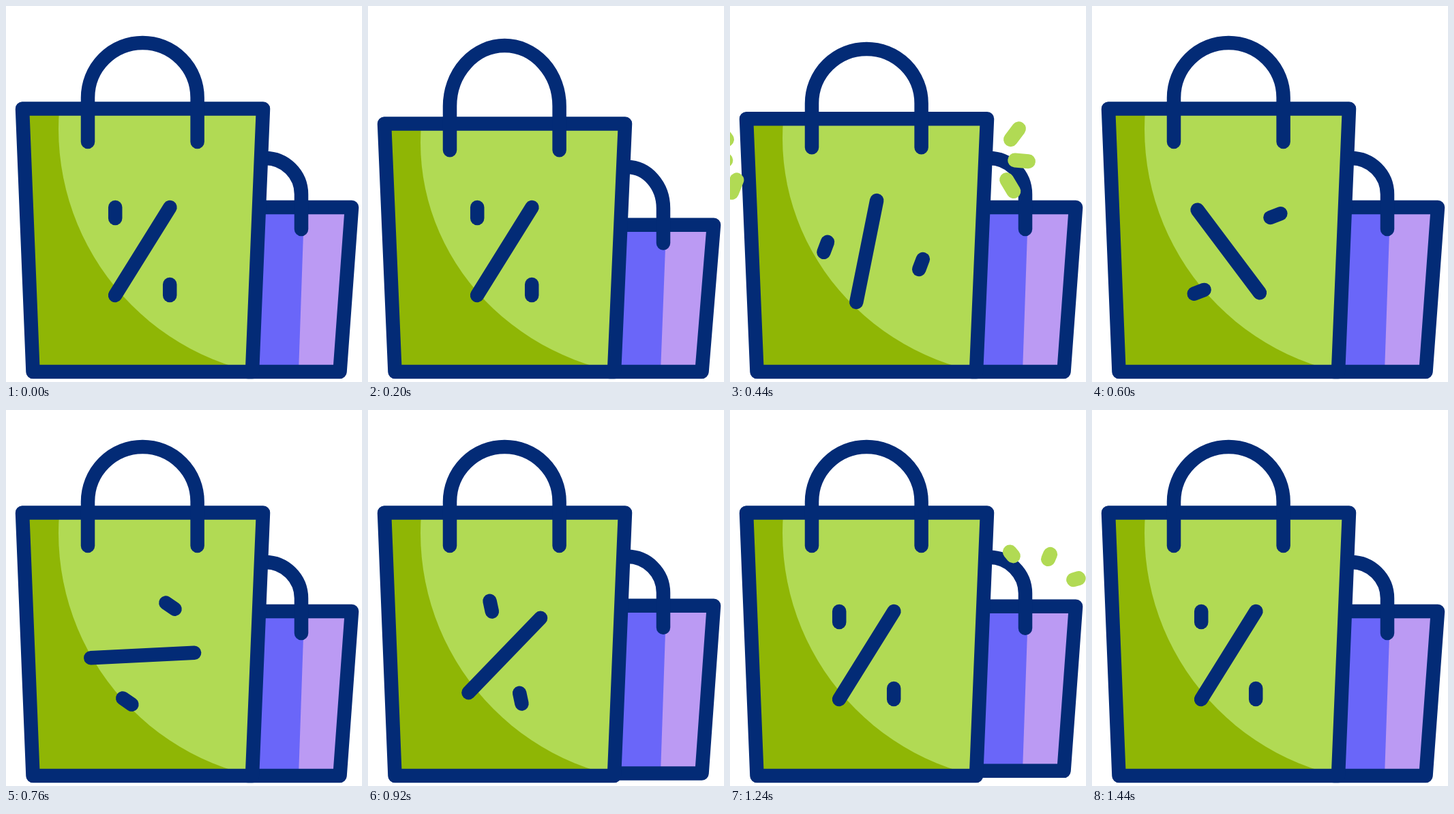
An HTML page with a canvas for the animation above (1.48 s loop, 522 px wide and 551 px high).

```html
<!DOCTYPE html>
<html lang="en">
<head>
<meta charset="utf-8">
<title>Shopping bags</title>
<style>
  html, body { margin: 0; width: 100%; height: 100%; overflow: hidden; background: #fff; }
  canvas { display: block; }
</style>
</head>
<body>
<canvas id="stage" width="522" height="551"></canvas>
<script>
const ctx = document.getElementById('stage').getContext('2d');
const LOOP = 1480, FLOOR = 536;
const NAVY = '#032b76', LIME = '#b1da54', GREEN = '#8fb605', BLUE = '#6a66f9', LILAC = '#bb9af3';

const rad = degrees => degrees * Math.PI / 180;
const ramp = (t, from, to) => Math.min(1, Math.max(0, (t - from) / (to - from)));
const ease = (t, from, to) => { const u = ramp(t, from, to); return u * u * (3 - 2 * u); };
// Eases up to 1, then back down to 0
const pulse = (t, a, b, c, d) => ease(t, a, b) - ease(t, c, d);
const bezier = (u, a, b, c) =>
  [0, 1].map(i => (1 - u) ** 2 * a[i] + 2 * u * (1 - u) * b[i] + u * u * c[i]);

function trace(points, close) {
  ctx.beginPath();
  points.forEach(([x, y]) => ctx.lineTo(x, y));
  if (close) ctx.closePath();
}

function polygon(points, color) {
  trace(points, true);
  ctx.fillStyle = color;
  ctx.fill();
}

function outline(color = NAVY, width = 20.5) {
  ctx.strokeStyle = color;
  ctx.lineWidth = width;
  ctx.stroke();
}

function segment(x1, y1, x2, y2, color, width) {
  trace([[x1, y1], [x2, y2]]);
  outline(color, width);
}

function handle(cx, radius, top, shoulder, end) {
  ctx.beginPath();
  ctx.moveTo(cx - radius, end);
  ctx.ellipse(cx, shoulder, radius, shoulder - top, 0, Math.PI, 2 * Math.PI);
  ctx.lineTo(cx + radius, end);
  outline();
}

function backBag(t) {
  const squash = pulse(t, 100, 280, 280, 440);
  const lift = 11 * pulse(t, 800, 980, 1160, 1360);
  const top = 295 + 44 * squash - lift;
  const bottom = FLOOR - 11 * pulse(t, 850, 1035, 1160, 1360);
  const body = [[355, top], [507, top], [489.5, bottom], [355, bottom]];
  polygon(body, LILAC);
  polygon([[355, top], [437.3, top], [429, bottom], [355, bottom]], BLUE);
  trace(body, true);
  outline();
  const drop = 35 * squash - lift;
  handle(380, 53, 223 + 22.5 * squash - lift, 276 + drop, 327 + drop);
}

function frontBag(t) {
  const squash = pulse(t, 100, 280, 280, 560);
  const top = 150.5 + 37.6 * squash;
  const scale = (FLOOR - top) / (FLOOR - 150.5);
  const body = [[24, top], [377, top], [361, FLOOR], [39.5, FLOOR]];
  polygon(body, GREEN);
  ctx.save();
  trace(body, true);
  ctx.clip();
  ctx.beginPath();
  ctx.ellipse(442, FLOOR - 356 * scale, 365, 365 * scale, 0, 0, 2 * Math.PI);
  ctx.fillStyle = LIME;
  ctx.fill();
  ctx.restore();
  trace(body, true);
  outline();
  const drop = 21 * squash;
  handle(200.3, 80.3, 54 + 13 * pulse(t, 110, 350, 350, 590), 134.5 + drop, 199 + drop);
}

// Each dot swings along two curves while spinning against the bar
const dotPaths = [
  [[-40, -56.5], [-82, 8], [-39, 65], [4.6, 74], [40, 56.5]],
  [[40, 56.5], [115, 17], [64, -60], [2, -100], [-40, -56.5]]
];

function percent(t) {
  const turn = Math.PI * ease(t, 280, 1040);
  ctx.save();
  ctx.translate(200.2, 359.5);
  ctx.save();
  ctx.rotate(-turn);
  segment(40.2, -64.5, -40.2, 64.5);
  ctx.restore();
  for (const [a, b, c, d, e] of dotPaths) {
    const [x, y] = t < 650 ? bezier(ease(t, 280, 650), a, b, c) : bezier(ease(t, 650, 1040), c, d, e);
    ctx.save();
    ctx.translate(x, y);
    ctx.rotate(turn);
    segment(0, -8, 0, 8);
    ctx.restore();
  }
  ctx.restore();
}

// Rays: inner point and direction in degrees
const frontRays = [
  [409, 199, -53], [413.5, 225.7, 5], [403.5, 251, 59],
  [-2, 199, -127], [-2, 225.7, 175], [11.5, 251, 112]
];
const backRays = [[433.5, 235.5, -130], [455.5, 244.5, -67], [476.5, 256.5, -16]];

function burst(t, start, rays) {
  const head = 36 * ramp(t, start, start + 120);
  const tail = 36 * ramp(t, start + 66, start + 186);
  if (head <= tail) return;
  for (const [x, y, angle] of rays) {
    const dx = Math.cos(rad(angle)), dy = Math.sin(rad(angle));
    segment(x + tail * dx, y + tail * dy, x + head * dx, y + head * dy, LIME, 21);
  }
}

function draw(now) {
  const t = now % LOOP;
  ctx.fillStyle = '#fff';
  ctx.fillRect(0, 0, 522, 551);
  ctx.lineCap = ctx.lineJoin = 'round';
  backBag(t);
  frontBag(t);
  percent(t);
  burst(t, 360, frontRays);
  burst(t, 1080, backRays);
}

let origin;
function tick(now) {
  origin ??= now;
  draw(now - origin);
  requestAnimationFrame(tick);
}
draw(0);
requestAnimationFrame(tick);
</script>
</body>
</html>
```
